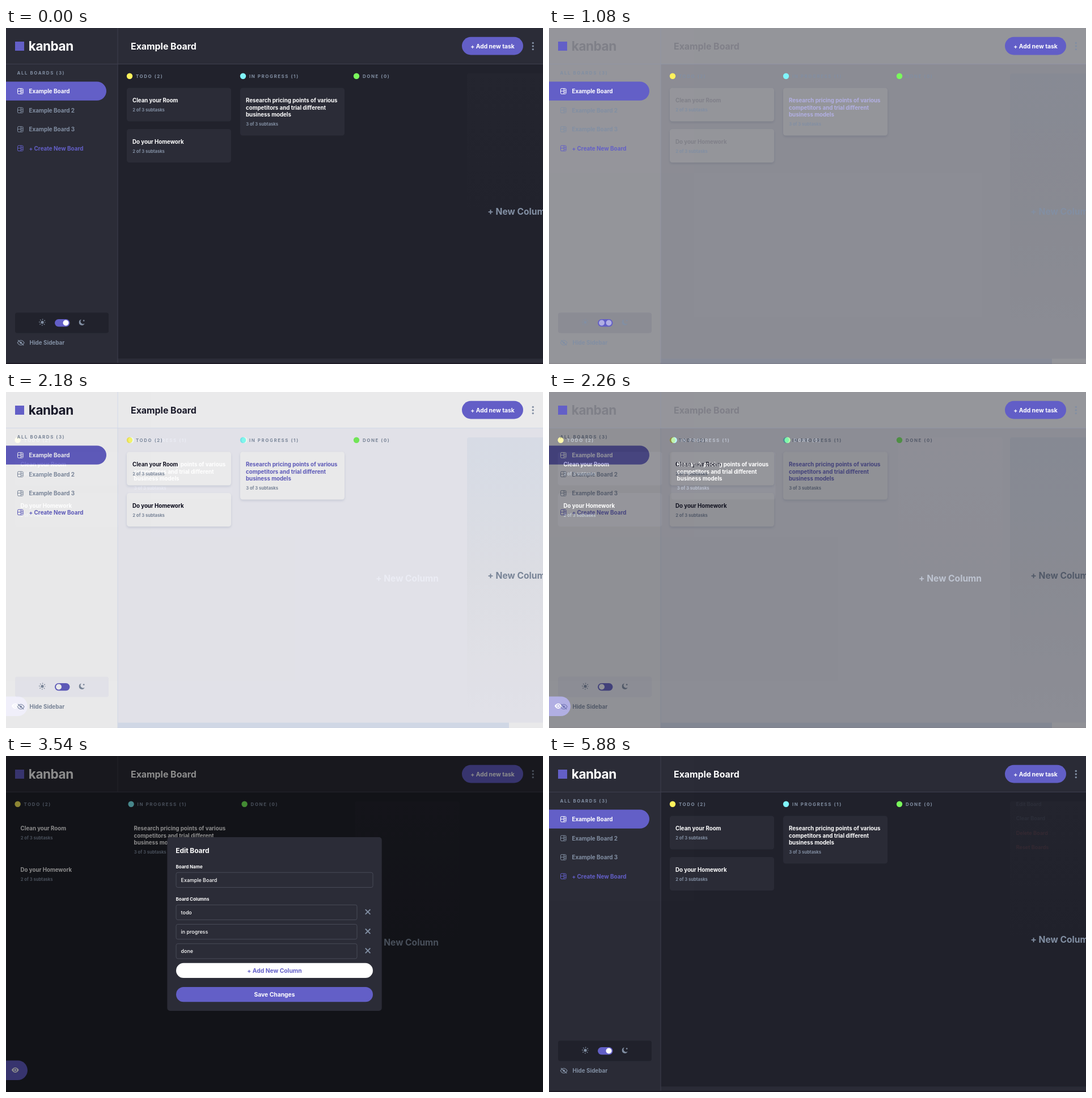
Animation, 947 px wide and 592 px high, one loop 5.9 s. Source, as an HTML page:

```html
<!DOCTYPE html>
<html lang="en">
<head>
<meta charset="utf-8">
<title>Kanban board</title>
<style>
  html, body { margin: 0; width: 100%; height: 100%; overflow: hidden; background: #21222c; }
  svg { position: absolute; left: 0; top: 0; width: 947px; height: 592px; }
  text { font-family: Inter, "Open Sans", sans-serif; font-weight: 700; white-space: pre; }
</style>
</head>
<body>
<script>
const GREY = '#828fa3', PURPLE = '#635fc7', RED = '#ea5555', WHITE = '#fff';
const DARK = { name: 'dark', board: '#21222c', panel: '#2b2c37', line: '#3e3f4e', ink: WHITE,
               hover: WHITE, thumb: '#2b2c37', fade: '#24252f', knob: 105.5 };
const LIGHT = { name: 'light', board: '#f7f7fd', panel: WHITE, line: '#e4ebfa', ink: '#000112',
                hover: PURPLE, thumb: '#e4ebfa', fade: '#ebf0fa', knob: 93 };
const HIDDEN_SHIFT = -197.4;

const rect = (x, y, w, h, fill, r = 0, extra = '') =>
  `<rect x="${x}" y="${y}" width="${w}" height="${h}" rx="${r}" fill="${fill}" ${extra}/>`;
const dot = (x, y, r, fill) => `<circle cx="${x}" cy="${y}" r="${r}" fill="${fill}"/>`;
const path = (d, stroke, width = 1, fill = 'none') =>
  `<path d="${d}" stroke="${stroke}" stroke-width="${width}" fill="${fill}"/>`;
// y is the middle of the capital letters
const text = (x, y, size, str, fill, extra = '') =>
  `<text x="${x}" y="${y + size * 0.364}" font-size="${size}" fill="${fill}" ${extra}>${str}</text>`;
const label = (x, y, str) => text(x, y, 7.9, str, GREY, 'letter-spacing="1.58"');
const centred = (x, y, str, fill) => text(x, y, 10.3, str, fill, 'text-anchor="middle"');
const tab = (y, w, h) => {
  const r = h / 2;
  return `<path d="M0 ${y}H${w - r}a${r} ${r} 0 0 1 0 ${h}H0z" fill="${PURPLE}"/>`;
};

function boardIcon(y, color) {
  return `<g transform="translate(20 ${y - 5.2})">` +
    rect(0.5, 0.5, 9.6, 9.4, 'none', 1.5, `stroke="${color}"`) +
    path('M6.3 .5V9.9M.5 5H6.3M6.3 3.6H10.1M6.3 6.9H10.1', color) + '</g>';
}

const ALMOND = 'M-6.4 0Q-3.6 -4.6 0 -4.6T6.4 0Q3.6 4.6 0 4.6T-6.4 0z';

function header(t) {
  return rect(0, 0, 947, 64, t.panel) +
    path('M0 63.5H947M197 0V64', t.line) +
    rect(16, 24, 16, 16, PURPLE) +
    text(39.8, 32, 22.5, 'kanban', t.ink, 'letter-spacing="-.45"') +
    text(220, 32, 15.9, 'Example Board', t.ink) +
    rect(804, 15.8, 108, 31.6, PURPLE, 15.8) +
    centred(858, 32, '+ Add new task', WHITE) +
    [26.4, 32, 37.6].map(y => dot(929.3, y, 1.7, GREY)).join('');
}

function sidebar(t) {
  const items = ['Example Board', 'Example Board 2', 'Example Board 3', '+ Create New Board'];
  const colors = [WHITE, GREY, GREY, PURPLE];
  return rect(0, 64, 197, 528, t.panel) + path('M197 64V592', t.line) +
    label(19.5, 79.5, 'ALL BOARDS (3)') + tab(94.5, 177, 33.3) +
    items.map((name, i) => {
      const y = 111.4 + i * 33.5;
      return boardIcon(y, colors[i]) + text(40.5, y, 9.9, name, colors[i]);
    }).join('') +
    rect(16, 501.5, 165, 36, t.board, 4) +
    dot(64, 518.5, 2.6, GREY) +
    `<circle cx="64" cy="518.5" r="5" fill="none" stroke="${GREY}" stroke-width="1.8" stroke-dasharray="1.3 2.627" stroke-dashoffset=".65"/>` +
    rect(86, 513, 26.5, 13.2, PURPLE, 6.6) + dot(t.knob, 519.5, 5, WHITE) +
    path('M133 513.6a5.1 5.1 0 1 0 5.6 6.8a4.4 4.4 0 0 1 -5.6 -6.8z', 'none', 0, GREY) +
    dot(137.2, 515.6, 1.3, GREY) +
    `<g transform="translate(26.2 554.5) scale(.92)">` +
    path(ALMOND, GREY, 1.3) + dot(0, 0, 2.1, GREY) + path('M-5.5 -5L5.5 5', GREY, 1.4) + '</g>' +
    text(41.5, 554.5, 9.9, 'Hide Sidebar', GREY);
}

function card(x, y, lines, subtasks, t, color, showBox) {
  const h = 46.5 + lines.length * 12.5;
  const shadow = t === LIGHT ? 'style="filter:drop-shadow(0 2px 2px rgba(54,78,126,.16))"' : '';
  return (showBox ? rect(x, y, 184, h, t.panel, 4.5, shadow) : '') +
    lines.map((line, i) => text(x + 10, y + 22 + i * 12.5, 9.7, line, color)).join('') +
    text(x + 10.2, y + 26.3 + lines.length * 12.5, 7.6, subtasks, GREY);
}

function columns(t, middle, showCards) {
  const heads = [['TODO (2)', '#fff25c'], ['IN PROGRESS (1)', '#80f5fc'], ['DONE (0)', '#7afa5c']];
  const research = ['Research pricing points of various', 'competitors and trial different', 'business models'];
  const fade = 'fade-' + t.name;
  return `<linearGradient id="${fade}" x2="0" y2="1">
      <stop stop-color="${t.fade}"/>
      <stop offset=".5" stop-color="${t === LIGHT ? '#f1f2f8' : t.board}"/>
      <stop offset="1" stop-color="${t.board}"/></linearGradient>` +
    rect(813, 80, 184, (middle - 80) * 2, `url(#${fade})`, 4) +
    heads.map(([name, color], i) =>
      dot(218 + i * 200, 84.7, 5.2, color) + label(229 + i * 200, 85, name)).join('') +
    card(213, 105.5, ['Clean your Room'], '2 of 3 subtasks', t, t.ink, showCards) +
    card(213, 178, ['Do your Homework'], '2 of 3 subtasks', t, t.ink, showCards) +
    card(413, 105.5, research, '3 of 3 subtasks', t, t.hover, showCards) +
    text(849.3, middle, 15.6, '+ New Column', GREY);
}

const bottomEdge = t => t === DARK ? rect(0, 590, 947, 2, '#1d1a25') : '';

function openBoard(t) {
  return rect(0, 0, 947, 592, t.board) + columns(t, 323.5, true) +
    rect(197, 582.5, 750, 9.5, t.panel) + rect(197, 582.5, 690, 9.5, t.thumb) +
    sidebar(t) + header(t) + bottomEdge(t);
}

function wideBoard(showCards = true) {
  return rect(0, 0, 947, 592, DARK.board) +
    `<g transform="translate(${HIDDEN_SHIFT})">${columns(DARK, 328, showCards)}</g>` +
    header(DARK) + tab(536.5, 38, 34.5) +
    `<g transform="translate(16.3 553.3)">` +
    path(ALMOND, 'none', 0, WHITE) + dot(0, 0, 3, PURPLE) + dot(0, 0, 1.8, WHITE) + '</g>' +
    bottomEdge(DARK);
}

function field(y, w, value) {
  return rect(300, y, w, 26.3, 'none', 3, 'stroke="#484a57"') +
    text(308.6, y + 13.3, 8.9, value, WHITE, 'style="font-weight:500"');
}

function editDialog() {
  const names = ['todo', 'in progress', 'done'];
  return rect(0, 0, 947, 592, '#000', 0, 'opacity=".45"') +
    rect(284.3, 143, 378.4, 306, DARK.panel, 5) +
    text(299.2, 167, 11.9, 'Edit Board', WHITE) +
    text(299.5, 195, 7.9, 'Board Name', WHITE) + field(205.2, 347, 'Example Board') +
    text(299.5, 252.3, 7.9, 'Board Columns', WHITE) +
    names.map((name, i) => {
      const y = 262.3 + i * 34.2;
      return field(y, 319, name) +
        path(`M633.8 ${y + 8}l8.6 8.6m0 -8.6l-8.6 8.6`, GREY, 1.9);
    }).join('') +
    rect(300, 364.8, 347, 26.3, WHITE, 13.15) + centred(473.5, 378, '+ Add New Column', PURPLE) +
    rect(300, 407, 347, 26.3, PURPLE, 13.15) + centred(473.5, 420.3, 'Save Changes', WHITE);
}

function boardMenu() {
  return ['Edit Board', 'Clear Board', 'Delete Board', 'Reset Boards'].map((name, i) =>
    text(823.8, 84.2 + i * 25.6, 9.1, name, i < 2 ? GREY : RED, 'style="font-weight:500"')).join('');
}

// Each scene fades in over the one before it, in steps of a tenth every 20 ms.
const LOOP = 5900, STEP = 20;
const scenes = [
  { art: openBoard(DARK) },
  { art: openBoard(LIGHT), start: 1000, steps: 10 },
  { art: wideBoard(), start: 2180, steps: 10 },
  { art: wideBoard(false) + editDialog(), start: 3360, steps: 10 },
  { art: openBoard(DARK) + boardMenu(), start: 4540, steps: 10 },
  { art: openBoard(DARK), start: 5720, steps: 9 },
];

document.body.innerHTML = scenes.map(s => `<svg viewBox="0 0 947 592">${s.art}</svg>`).join('');

scenes.forEach(({ start, steps }, i) => {
  if (!start) return;
  const end = start + steps * STEP, top = steps / 10;
  document.body.children[i].animate([
    { opacity: 0, offset: 0, easing: 'steps(1, end)' },
    { opacity: 0, offset: start / LOOP, easing: `steps(${steps}, start)` },
    { opacity: top, offset: end / LOOP },
    ...(end < LOOP ? [{ opacity: top, offset: 1 }] : []),
  ], { duration: LOOP, iterations: Infinity });
});
</script>
</body>
</html>
```
